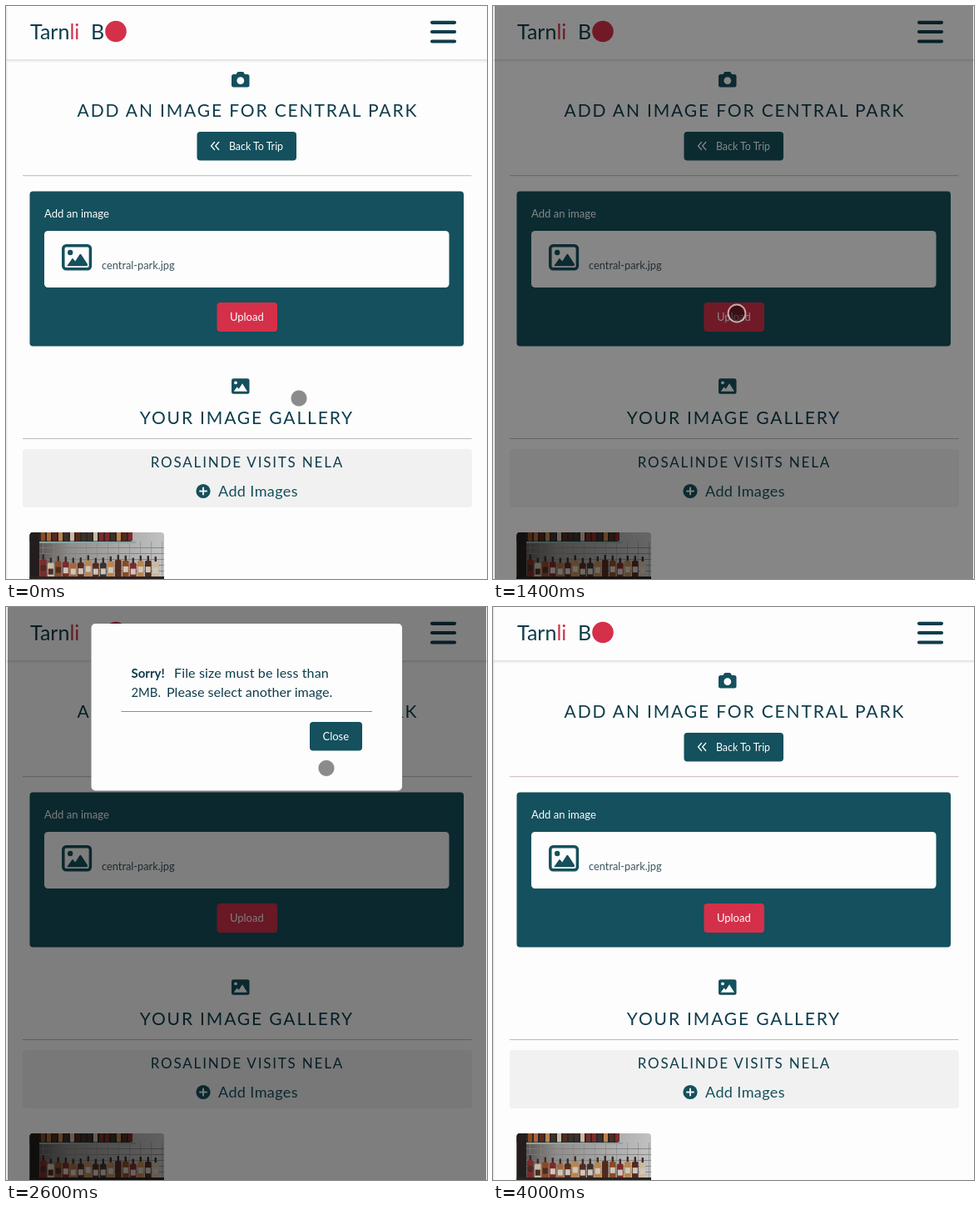
These frames come from a looping animation (578x688 px, 4100 ms). An HTML page:

```html
<!DOCTYPE html>
<html lang="en">
<head>
<meta charset="utf-8">
<title>Image upload</title>
<style>
  html, body { margin: 0; width: 100%; height: 100%; overflow: hidden; background: #fdfdfd; }
  svg { display: block; width: 578px; height: 688px; font-family: Lato, "Open Sans", sans-serif; }
  .teal { fill: #14505d; }
  .red { fill: #d4304a; }
  .ink { fill: #0f3d4c; }
  .white { fill: #fdfdfd; }
  .mid { text-anchor: middle; }
  .small { font-size: 12.8px; }
  .head { font-size: 21px; letter-spacing: 1.85px; }
  .logo { font-size: 25px; }
  .msg { font-size: 16.1px; }
</style>
</head>
<body>
<svg viewBox="0 0 578 688" xmlns="http://www.w3.org/2000/svg">
  <defs>
    <clipPath id="photoClip"><rect x="28.500" y="632" width="161.500" height="70" rx="4"/></clipPath>
    <linearGradient id="wall" x2="1" y2="0">
      <stop offset="0" stop-color="#4a4543"/>
      <stop offset=".3" stop-color="#8f8d8b"/>
      <stop offset="1" stop-color="#c0c1c2"/>
    </linearGradient>
    <linearGradient id="shade" x2="0" y2="1">
      <stop offset="0" stop-color="#000" stop-opacity=".12"/>
      <stop offset="1" stop-color="#000" stop-opacity="0"/>
    </linearGradient>
  </defs>

  <rect width="578" height="688" fill="#fdfdfd"/>

  <!-- header -->
  <rect y="64" width="578" height="4" fill="url(#shade)"/>
  <path d="M.75 0V688" stroke="#dedede" stroke-width="1"/>
  <g class="logo">
    <text class="ink" x="29" y="39.500">Tarn<tspan class="red">li</tspan></text>
    <text class="ink" x="102" y="39.500">B</text>
  </g>
  <circle class="red" cx="132" cy="30.500" r="12.800"/>
  <path d="M512 19.800H539M512 31H539M512 42.500H539" stroke="#0f3d4c" stroke-width="4.200" stroke-linecap="round"/>

  <!-- title -->
  <path class="teal" fill-rule="evenodd" d="M273.500 82H276.500L277.800 79.800Q278.200 79 279.200 79H284.300Q285.300 79 285.700 79.800L287 82H290Q292.500 82 292.500 84.500V95Q292.500 97.500 290 97.500H273.500Q271 97.500 271 95V84.500Q271 82 273.500 82ZM281.800 85.300A4.400 4.400 0 1 0 281.800 94.100A4.400 4.400 0 1 0 281.800 85.300Z"/>
  <text class="ink head mid" x="290.400" y="133">ADD AN IMAGE FOR CENTRAL PARK</text>
  <rect class="teal" x="229.500" y="151" width="119.500" height="34.500" rx="4"/>
  <path d="M250.500 163.500L246.500 168L250.500 172.500M255.700 163.500L251.700 168L255.700 172.500" fill="none" stroke="#fdfdfd" stroke-width="1.300" stroke-linecap="round"/>
  <text class="white mid" x="300.500" y="172.500" font-size="12.400">Back To Trip</text>
  <path d="M20 203.700H559.500" stroke="#cdb6ba"/>

  <!-- upload form -->
  <rect class="teal" x="28.500" y="222.500" width="521.500" height="186" rx="4"/>
  <text class="white" x="46" y="253.500" font-size="13.100">Add an image</text>
  <rect class="white" x="46" y="270" width="486.500" height="68" rx="4.500"/>
  <g transform="translate(67 286)">
    <rect x="1.800" y="1.800" width="32.600" height="28" rx="3.500" fill="none" stroke="#14505d" stroke-width="3.500"/>
    <circle class="teal" cx="10.200" cy="10" r="3.200"/>
    <path class="teal" d="M6.500 25.800L12.300 17.500Q13 16.700 13.700 17.500L16.200 20.500L21.500 12.300Q22.400 11.200 23.300 12.300L31 24Q31.500 26 29.800 26.300H7Q5.900 26.300 6.500 25.800Z"/>
  </g>
  <text x="115" y="315.500" class="small" fill="#3d5660">central-park.jpg</text>
  <rect class="red" x="253.500" y="356" width="72.500" height="35" rx="4"/>
  <text class="white mid" x="289.300" y="377.500" font-size="13">Upload</text>

  <!-- gallery -->
  <rect class="teal" x="271" y="447.200" width="21.500" height="18.500" rx="2.500"/>
  <circle class="white" cx="276" cy="452.300" r="1.900"/>
  <path class="white" d="M273.700 462.800L277.600 457.400L279.800 459.800L284 453.300L290 462.800Z"/>
  <text class="ink head mid" x="289.400" y="501.500">YOUR IMAGE GALLERY</text>
  <path d="M20 519.500H559.500" stroke="#bdb9bb"/>
  <rect x="20" y="532" width="540" height="70" rx="4" fill="#f1f1f1"/>
  <text class="ink mid" x="289.900" y="554" font-size="17" letter-spacing="1.800">ROSALINDE VISITS NELA</text>
  <circle class="teal" cx="237" cy="582.500" r="8.600"/>
  <path d="M233 582.500H241M237 578.500V586.500" stroke="#f1f1f1" stroke-width="2" stroke-linecap="round"/>
  <text class="teal" x="255" y="589" font-size="18" letter-spacing=".4">Add Images</text>
  <g id="photo" clip-path="url(#photoClip)"></g>

  <rect id="dim" x="2" width="575" height="688"/>

  <g id="modal">
    <rect x="102.500" y="20" width="373.500" height="200.500" rx="5" fill="#fdfdfd"/>
    <g class="ink msg">
      <text x="150.500" y="85" font-weight="700" font-size="15">Sorry!</text>
      <text x="202" y="85" letter-spacing=".12">File size must be less than</text>
      <text x="150.500" y="108" font-size="14.800">2MB.</text>
      <text x="193" y="108">Please select another image.</text>
    </g>
    <path d="M138.500 125.500H440" stroke="#a8808a"/>
    <rect class="teal" x="365" y="138" width="63" height="34.500" rx="4"/>
    <text class="white mid" x="396.300" y="159.500" font-size="13">Close</text>
  </g>

  <g id="cursor">
    <circle id="dot" r="10"/>
    <circle r="10.400" fill="none" stroke="#fff" stroke-opacity=".62" stroke-width="2"/>
  </g>
</svg>
<script>
const $ = id => document.getElementById(id);
const LOOP = 4100, STEP = 100;

// Bar shelves: tiled wall, a lit shelf and two rows of bottles.
function drawPhoto() {
  let seed = 7;
  const rnd = () => (seed = seed * 16807 % 2147483647) / 2147483647;
  const out = [];
  const box = (x, y, w, h, fill, r = 0) =>
    out.push(`<rect x="${x}" y="${y}" width="${w}" height="${h}" rx="${r}" fill="${fill}"/>`);
  const tones = ['#8a4a24', '#b9844e', '#552a1c', '#c9b9a2', '#7d2a2a', '#3b302b', '#a4683a'];
  const tone = () => tones[Math.floor(rnd() * tones.length)];

  box(28, 632, 162, 56, 'url(#wall)');
  for (let y = 650; y < 688; y += 7) box(40, y, 150, .8, '#7b7a7a');
  for (let x = 44; x < 190; x += 13) box(x, 643, .6, 45, '#858484');
  box(28, 632, 122, 11, '#2d2522');
  for (let x = 42; x < 150; x += 7) box(x, 630, 5, 12.5, tone(), 1);
  box(36, 643, 120, 2, '#86a4a6');
  box(28, 632, 12, 56, '#231e1d');
  for (let x = 41; x < 184; x += 9) {
    const fill = tone(), top = 664 + rnd() * 5;
    box(x + 2.6, top - 6, 2.4, 8, '#3a2a25');
    box(x, top, 7.6, 30, fill, 1.5);
    box(x + .8, top + 7, 6, 7, rnd() < .6 ? '#d0c6b8' : '#4b2b24');
  }
  box(28, 685, 162, 3, '#2a2221');
  $('photo').innerHTML = out.join('');
}

const smooth = u => u * u * (3 - 2 * u);

// start, end, from, to
const moves = [
  [0, 1100, [352, 471], [293, 369]],
  [1700, 2900, [293, 369], [402, 161]],
  [3200, 3800, [402, 161], [301, -13]]
];
function cursorAt(t) {
  const [a, b, from, to] = moves.filter(m => m[0] <= t).pop();
  const k = smooth(Math.min(1, (t - a) / (b - a)));
  return from.map((v, i) => v + (to[i] - v) * k);
}

// time, backdrop opacity, modal opacity, modal offset
const fades = [
  [0, 0, 0, 0],
  [1300, .2, 0, 0],
  [1400, .47, 0, 0],
  [1500, .5, .5, -18],
  [1600, .5, 1, -5],
  [1700, .5, 1, 0],
  [3300, .5, .5, -14],
  [3400, .5, 0, 0],
  [3500, .32, 0, 0],
  [3600, .1, 0, 0],
  [3700, 0, 0, 0]
];
const pressed = t => (t >= 1100 && t < 1400) || (t >= 3100 && t < 3300);

function render(now) {
  const t = Math.floor(now % LOOP / STEP) * STEP;
  const [, dim, modal, dy] = fades.filter(f => f[0] <= t).pop();
  $('dim').setAttribute('opacity', dim);
  $('modal').setAttribute('opacity', modal);
  $('modal').setAttribute('transform', `translate(0 ${dy})`);
  $('cursor').setAttribute('transform', `translate(${cursorAt(t)})`);
  $('dot').setAttribute('fill-opacity', pressed(t) ? .6 : .45);
}

drawPhoto();
const start = performance.now();
function tick() {
  render(performance.now() - start);
  requestAnimationFrame(tick);
}
tick();
</script>
</body>
</html>
```
